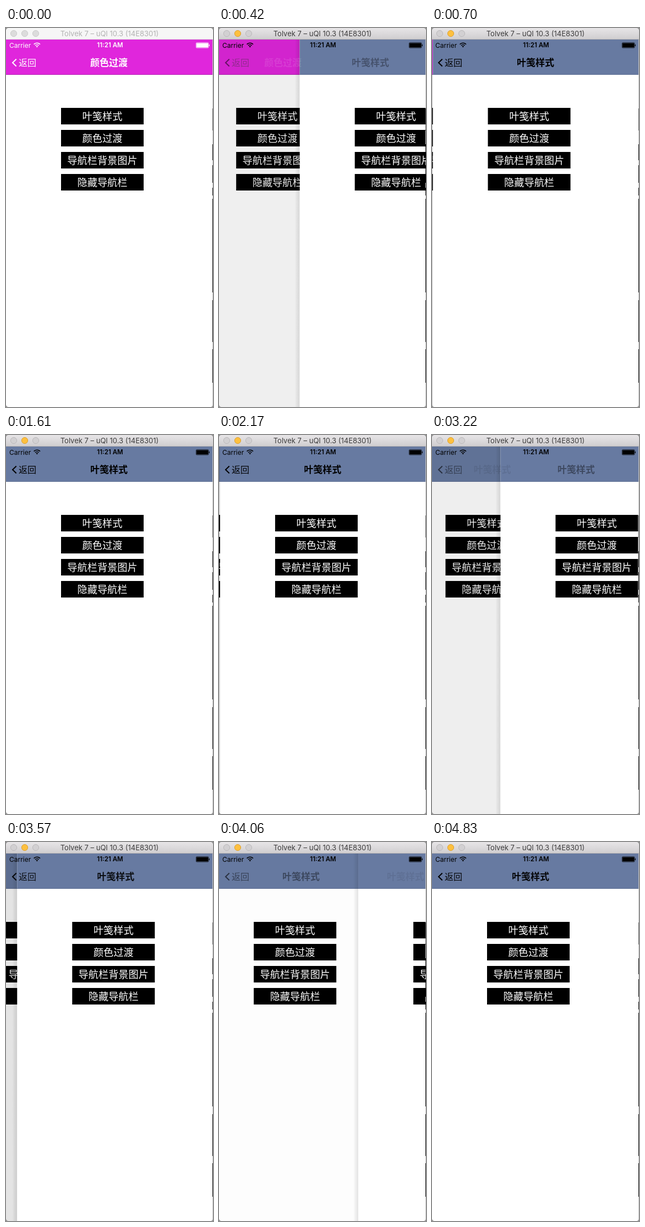
Animation of 376 by 688 pixels, one loop 4.9 s. Source, as an HTML page with a canvas:

```html
<!DOCTYPE html>
<html lang="zh-CN">
<head>
<meta charset="utf-8">
<title>导航栏过渡</title>
<style>
html, body { margin: 0; width: 100%; height: 100%; overflow: hidden; background: #fff; }
canvas { display: block; width: 376px; height: 688px; }
</style>
</head>
<body>
<canvas id="stage" width="376" height="688"></canvas>
<script>
const ctx = document.getElementById('stage').getContext('2d');
const W = 376, H = 688, LOOP = 4900, STEP = 70;
const CJK = '"Noto Sans CJK SC", "Noto Sans CJK", sans-serif';
const LATIN = 'Inter, Roboto, sans-serif';
const PINK = { bar: '#e026dc', line: '#b41fb2', ink: '#fff', title: '颜色过渡' };
const BLUE = { bar: '#677aa1', line: '#5f7094', ink: '#000', title: '叶笺样式' };
const LABELS = ['叶笺样式', '颜色过渡', '导航栏背景图片', '隐藏导航栏'];
const PUSHES = [
  { at: 317, from: PINK, to: BLUE },
  { at: 1800, from: BLUE, to: BLUE },
  { at: 3105, from: BLUE, to: BLUE }
];
const POP_START = 3535, POP_END = 4620;

const clamp = v => Math.max(0, Math.min(1, v));

function rect(x, y, w, h, color) {
  ctx.fillStyle = color;
  ctx.fillRect(x, y, w, h);
}

function text(str, x, y, font, color, align = 'center') {
  ctx.font = font;
  ctx.fillStyle = color;
  ctx.textAlign = align;
  ctx.fillText(str, x, y);
}

function withAlpha(alpha, draw) {
  ctx.save();
  ctx.globalAlpha *= clamp(alpha);
  draw();
  ctx.restore();
}

// Critically damped spring, snapped to rest at the end.
function springProgress(ms) {
  if (ms <= 0) return 0;
  const k = ms * 0.02;
  const rest = (1 + k) * Math.exp(-k);
  return rest < 0.001 ? 1 : 1 - rest;
}

function stateAt(t) {
  if (t >= POP_START) {
    const u = clamp((t - POP_START) / (POP_END - POP_START));
    const q = Math.pow(1 - u, 1.69);
    return {
      from: BLUE, to: BLUE, p: q, dim: Math.max(0, q * 0.16 - 0.045),
      titleP: Math.max(q, 0.07), boost: 0.1 * clamp((t - 4690) / 140)
    };
  }
  const push = PUSHES.filter(s => t >= s.at).pop() || PUSHES[0];
  const p = springProgress(t - push.at);
  return { from: push.from, to: push.to, p, dim: 0.1 * p, titleP: p, boost: 0 };
}

function drawPage(x, style) {
  ctx.save();
  ctx.translate(x, 0);
  rect(0, 21, W, H - 21, '#fff');
  rect(0, 21, W, 64, style.bar);
  rect(0, 84, W, 1, style.line);
  LABELS.forEach((label, i) => {
    const y = 145 + i * 40;
    rect(100, y, 150, 30, '#000');
    text(label, 175, y + 21.8, '18.2px ' + CJK, '#fff');
  });
  ctx.restore();
}

function drawPages({ from, to, p, dim }) {
  const x = W * (1 - p);
  if (p < 1) {
    drawPage(-0.3 * W * p, from);
    rect(0, 21, x, H - 21, `rgba(0,0,0,${dim})`);
  }
  if (p > 0) {
    if (p < 1) {
      const shade = ctx.createLinearGradient(x - 9, 0, x, 0);
      shade.addColorStop(0, 'rgba(0,0,0,0)');
      shade.addColorStop(0.4, 'rgba(0,0,0,.05)');
      shade.addColorStop(1, 'rgba(0,0,0,.1)');
      rect(x - 9, 21, 9, H - 21, shade);
    }
    drawPage(x, to);
  }
}

function drawChevron(color) {
  ctx.strokeStyle = color;
  ctx.lineWidth = 2;
  ctx.beginPath();
  ctx.moveTo(18.7, 56.5);
  ctx.lineTo(12, 63);
  ctx.lineTo(18.7, 69.5);
  ctx.stroke();
}

function drawNavigation({ from, to, titleP: p, boost }) {
  const sides = [
    { style: from, alpha: Math.pow(1 - p, 2.3), dx: -116 * p },
    { style: to, alpha: Math.pow(p, 2.3), dx: 0.6 * W * (1 - p) }
  ];
  sides.forEach(({ style, alpha, dx }, i) => {
    withAlpha(alpha + (i ? 0 : boost), () => {
      text(style.title, 187 + dx, 69.3, '600 17px ' + CJK, style.ink);
      text('返回', 23, 69, '16px ' + CJK, style.ink, 'left');
    });
  });
  const front = p < 0.5 ? from : to;
  withAlpha(Math.pow(Math.max(p, 1 - p), 1.35) + boost, () => drawChevron(front.ink));
}

function drawStatus(color) {
  text('Carrier', 6, 35.5, '12px ' + LATIN, color, 'left');
  text('11:21 AM', 189, 35.3, '600 11.5px ' + LATIN, color);

  ctx.strokeStyle = color;
  ctx.lineWidth = 1.6;
  for (const r of [4.5, 7.8]) {
    ctx.beginPath();
    ctx.arc(56.3, 35, r, -Math.PI * 0.76, -Math.PI * 0.24);
    ctx.stroke();
  }
  ctx.fillStyle = color;
  ctx.beginPath();
  ctx.moveTo(56.3, 35.3);
  ctx.arc(56.3, 35, 2.4, -Math.PI * 0.78, -Math.PI * 0.22);
  ctx.fill();

  ctx.lineWidth = 0.7;
  ctx.beginPath();
  ctx.roundRect(345.2, 26.7, 22.8, 9.4, 1.5);
  ctx.stroke();
  rect(346, 27.5, 21.2, 7.8, color);
  rect(368.4, 29.8, 1.3, 3.2, color);
}

function drawTitleBar(active) {
  const fill = ctx.createLinearGradient(0, 0, 0, 20);
  fill.addColorStop(0, active ? '#e7e5e7' : '#f6f6f6');
  fill.addColorStop(1, active ? '#d0ced0' : '#f6f6f6');
  rect(0, 0, W, 21, fill);
  rect(0, 20, W, 1, active ? '#b3b1b3' : '#dcdcdc');
  [14, 34, 54].forEach((x, i) => {
    const lit = active && i === 1;
    ctx.fillStyle = lit ? '#fdc03f' : active ? '#d2d0d2' : '#dcdcdc';
    ctx.strokeStyle = lit ? '#dca032' : active ? '#bbb9bb' : '#cbcbcb';
    ctx.lineWidth = 1;
    ctx.beginPath();
    ctx.arc(x, 10, 5.6, 0, 7);
    ctx.fill();
    ctx.stroke();
  });
  text('Tolvek 7 – uQI 10.3 (14E8301)', 188, 15, '13px ' + LATIN, active ? '#3d3c3d' : '#b2b2b2');
}

function drawDesktopEdge() {
  rect(375, 21, 1, H - 21, '#c4c4c4');
  rect(375, 146, 1, 40, '#555');
  for (const [top, bottom] of [[211, 240], [249, 281], [290, 304], [310, 480], [494, 570], [583, 644]]) {
    rect(375, top, 1, bottom - top, '#000');
  }
}

function drawCorners() {
  ctx.fillStyle = '#8d8d8d';
  ctx.beginPath();
  ctx.rect(0, 0, W, H);
  ctx.roundRect(0, 0, W, H, 4.5);
  ctx.fill('evenodd');
}

function render(now) {
  const t = Math.floor((now % LOOP) / STEP) * STEP;
  const state = stateAt(t);
  rect(0, 0, W, H, '#fff');
  drawPages(state);
  drawNavigation(state);
  drawStatus(state.p > 0 ? state.to.ink : state.from.ink);
  drawTitleBar(t >= 280);
  drawDesktopEdge();
  drawCorners();
  requestAnimationFrame(render);
}

requestAnimationFrame(render);
</script>
</body>
</html>
```
